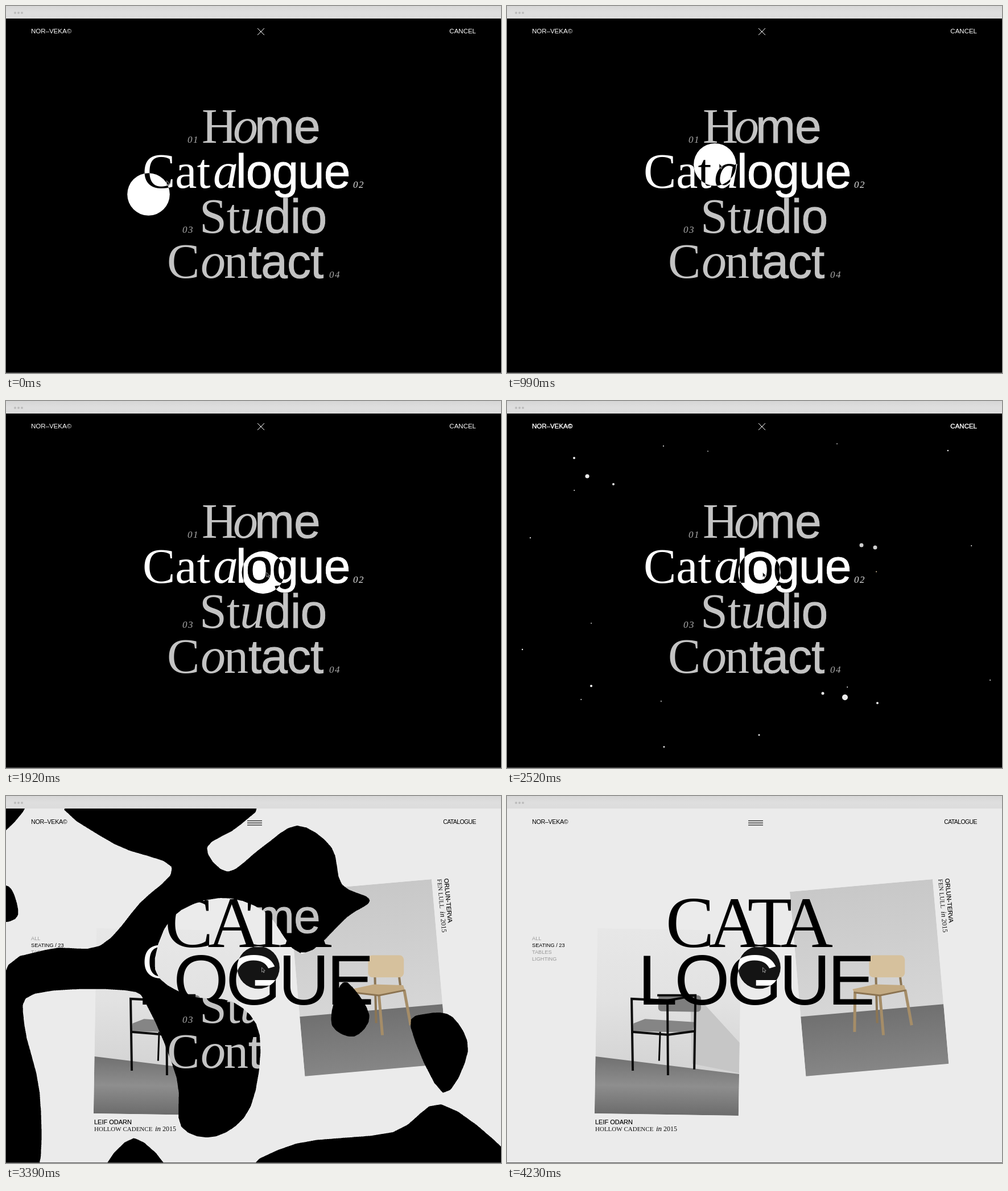
Recreate the animation shown at these times as an HTML page with a canvas. Size 870 px wide and 644 px high, loop 4830 ms.

```html
<!DOCTYPE html>
<html lang="en">
<head>
<meta charset="utf-8">
<title>Menu transition</title>
<style>
html, body { margin: 0; width: 100%; height: 100%; overflow: hidden; background: #000; }
canvas { display: block; }
</style>
</head>
<body>
<canvas id="stage" width="870" height="644"></canvas>
<script>
const W = 870, H = 644, LOOP = 4830;
const START = 2250, DOTS = 2520, BLOBS = 3000, PATCHES = 3390, DONE = 4230;
const SANS = '"Liberation Sans", Arial, sans-serif';
const SERIF = '"Liberation Serif", "Times New Roman", serif';
const PAPER = '#ebebeb';

const clamp = v => Math.max(0, Math.min(1, v));
const mix = (a, b, w) => a + (b - a) * w;
const pairs = a => Array.from({ length: a.length / 2 }, (_, i) => [a[2 * i], a[2 * i + 1]]);

function layer(paint, w = W, h = H) {
  const canvas = document.createElement('canvas');
  canvas.width = w;
  canvas.height = h;
  const c = canvas.getContext('2d', { willReadFrequently: !paint });
  if (paint) paint(c);
  return c;
}

function text(c, s, x, y, font, fill, gap = 0, bold = 0, align = 'left') {
  c.font = font;
  c.letterSpacing = gap + 'px';
  c.textAlign = align;
  c.fillStyle = c.strokeStyle = fill;
  c.fillText(s, x, y);
  if (bold) {
    c.lineWidth = bold;
    c.strokeText(s, x, y);
  }
}

function trace(c, points) {
  c.beginPath();
  pairs(points).forEach(p => c.lineTo(...p));
}
function shape(c, fill, ...points) {
  trace(c, points);
  c.closePath();
  c.fillStyle = fill;
  c.fill();
}
function line(c, color, width, ...points) {
  trace(c, points);
  c.strokeStyle = color;
  c.lineWidth = width;
  c.stroke();
}
function disc(c, x, y, r) {
  c.beginPath();
  c.arc(x, y, r, 0, 7);
  c.fill();
}
function fade(c, y0, y1, ...colors) {
  const g = c.createLinearGradient(0, y0, 0, y1);
  colors.forEach((color, i) => g.addColorStop(i / (colors.length - 1), color));
  return g;
}

// Dark page: words are runs of upright serif (r), italic serif (i) and sans (s)
const WORDS = [
  { runs: [['r', 'H', 344], ['i', 'o', 399], ['s', 'me', 437]], noX: 319 },
  { runs: [['r', 'Cat', 240], ['i', 'a', 364], ['s', 'logue', 404]], noX: 610 },
  { runs: [['r', 'St', 340], ['i', 'u', 411], ['s', 'dio', 454]], noX: 310 },
  { runs: [['r', 'C', 283], ['i', 'o', 342], ['r', 'n', 383], ['s', 'tact', 426]], noX: 568 }
];
const FACES = { r: `86px ${SERIF}`, i: `italic 88px ${SERIF}`, s: `84px ${SANS}` };

function paintMenu(c, bold) {
  c.fillStyle = '#000';
  c.fillRect(0, 0, W, H);
  text(c, 'NOR–VEKA©', 44, 48, `11.5px ${SANS}`, '#fff', 0, bold);
  text(c, 'CANCEL', 826, 48, `11.5px ${SANS}`, '#fff', 0, bold, 'right');
  line(c, '#fff', 1, 442, 39, 454, 51);
  line(c, '#fff', 1, 454, 39, 442, 51);
  WORDS.forEach(({ runs, noX }, i) => {
    const y = 240 + 79 * i, active = i === 1;
    for (const [face, s, x] of runs) {
      const sans = face === 's';
      text(c, s, x, y, FACES[face], active ? '#fff' : '#c3c3c3', sans ? -1 : 0, sans ? 0.9 : 0);
    }
    text(c, '0' + (i + 1), noX, y, `italic 17px ${SERIF}`, active ? '#ddd' : '#aaa', 1.5);
  });
}

// Light page; each photo is drawn upright in its own tilted frame
function photo(c, x, y, degrees, w, h, paint) {
  c.save();
  c.translate(x, y);
  c.rotate(degrees * Math.PI / 180);
  c.beginPath();
  c.rect(0, 0, w, h);
  c.clip();
  paint(c, w, h);
  c.restore();
}

function paintArmchair(c, w, h) {
  c.fillStyle = fade(c, 0, 250, '#e7e7e7', '#e2e2e2', '#d3d3d3');
  c.fillRect(0, 0, w, h);
  shape(c, '#c6c6c6', 165, 115, 185, 125, w, 197, w, 250, 170, 235);
  shape(c, fade(c, 225, h, '#707070', '#8e8e8e', '#6c6c6c'), 0, 225, w, 252, w, h, 0, h);
  c.fillStyle = '#7e7e7e';
  c.beginPath();
  c.roundRect(109, 115, 75, 29, 6);
  c.fill();
  shape(c, '#858585', 66, 166, 86, 158, 173, 162, 170, 180, 65, 180);
  const black = '#0c0c0c';
  line(c, black, 3, 113, 180, 112, 231);
  line(c, black, 4, 66, 249, 62, 123, 125, 125, 128, 256);
  line(c, black, 4, 107, 116, 174, 115, 174, 245);
  line(c, black, 4, 125, 125, 174, 115);
  line(c, black, 4, 65, 181, 127, 185, 173, 178);
}

function paintWoodChair(c, w, h) {
  c.fillStyle = fade(c, 0, 220, '#c8c8c8', '#d6d6d6');
  c.fillRect(0, 0, w, h);
  c.fillStyle = fade(c, 220, h, '#707070', '#868686');
  c.fillRect(0, 220, w, h);
  const wood = '#a58d68';
  line(c, '#8b7554', 4, 138, 159, 133, 243);
  line(c, '#8b7554', 4, 180, 160, 181, 184);
  line(c, wood, 5, 99, 184, 92, 255);
  line(c, wood, 5, 142, 193, 142, 265);
  line(c, wood, 5, 187, 189, 193, 252);
  shape(c, '#c3aa82', 95, 180, 135, 175, 186, 181, 188, 189, 142, 194, 97, 185);
  line(c, '#8b7351', 3, 97, 186, 142, 195, 188, 190);
  photo(c, 129, 123, 5, 64, 40, () => {
    c.fillStyle = '#d6c19d';
    c.beginPath();
    c.roundRect(0, 0, 63, 39, 8);
    c.fill();
  });
}

function caption(c, name, title, end) {
  text(c, name, 0, 0, `11px ${SANS}`, '#000', 0, 0.15);
  text(c, title, 0, 12, `11px ${SERIF}`, '#111');
  text(c, 'in', end, 12, `italic 13px ${SERIF}`, '#000');
  text(c, '2015', end + 13, 12, `12px ${SERIF}`, '#111');
}

function paintCatalogue(c) {
  c.fillStyle = PAPER;
  c.fillRect(0, 0, W, H);
  photo(c, 159, 232, 0.9, 253, 325, paintArmchair);
  photo(c, 497, 168, -5, 252, 325, paintWoodChair);
  text(c, 'NOR–VEKA©', 44, 48.5, `10.7px ${SANS}`, '#000', -0.3);
  text(c, 'CATALOGUE', 826, 48.5, `10.5px ${SANS}`, '#000', -0.6, 0, 'right');
  for (const y of [43.5, 47.3, 51]) line(c, '#222', 1.3, 424, y, 450, y);
  ['ALL', 'SEATING / 23', 'TABLES', 'LIGHTING'].forEach((s, i) =>
    text(c, s, 44, 252.5 + i * 12.2, `9.2px ${SANS}`, i === 1 ? '#000' : '#999'));
  text(c, 'CATA', 279, 265, `128px ${SERIF}`, '#000', -10);
  text(c, 'LOGUE', 230, 366, `125px ${SANS}`, '#000', -5.2);
  c.save();
  c.translate(155, 576);
  caption(c, 'LEIF ODARN', 'HOLLOW CADENCE', 107);
  c.translate(615, -431);
  c.rotate(85 * Math.PI / 180);
  caption(c, 'ORLUN-TERVA', 'FEN LULL', 57);
  c.restore();
}

// Reveal shapes: round drops, smooth blobs and the dark patches left at the end
const drops = [
  [52, 406, 17], [250, 109, 14.5], [605, 105, 12.5], [750, 117, 17], [468, 556, 21], [246, 497, 18.5],
  [173, 360, 12.5], [251, 577, 20], [378, 118, 12], [16, 270, 16], [440, 638, 22], [351, 645, 18],
  [732, 35, 18], [868, 153, 14]
];
const blobs = [
  [97, 50, 170, 97, 194, 133, 124, 200, 103, 262, 82, 232, 102, 194, 74, 85],
  [271, 318, 320, 235, 410, 240, 478, 280, 410, 293, 345, 320],
  [592, 265, 645, 247, 700, 270, 673, 322, 653, 375, 632, 318],
  [492, 346, 540, 375, 525, 432, 463, 390],
  [530, 460, 640, 450, 703, 517, 600, 563, 518, 520],
  [123, 441, 192, 528, 130, 606, 76, 520],
  [828, 207, 855, 235, 800, 309, 782, 265],
  [835, 408, 885, 465, 885, 566, 805, 540, 836, 470]
];
const seeds = [
  [118, 100, 2], [141, 132, 3.5], [187, 146, 2], [148, 500, 2],
  [623, 253, 3.5], [647, 257, 3.5], [555, 513, 2.5], [594, 520, 5], [651, 530, 2]
];
const mainland = [
  110, 10, 421, 10, 410, 52, 353, 90, 390, 133, 450, 90, 512, 52, 572, 90, 590, 155, 640, 182, 600, 212,
  520, 277, 455, 203, 375, 179, 291, 214, 262, 305, 320, 350, 400, 362, 446, 420, 430, 545, 370, 597,
  308, 580, 300, 495, 250, 372, 210, 341, 50, 347, 32, 400, 59, 520, 55, 660, -10, 660, -10, 332,
  70, 270, 165, 263, 235, 188, 292, 125, 190, 84
];
const islands = [
  [-10, 10, 36, 16, -10, 66],
  [-10, 162, 10, 164, 21, 210, -10, 218],
  [600, 327, 639, 385, 612, 422, 573, 403, 580, 350],
  [740, 382, 785, 388, 812, 447, 768, 521, 711, 405],
  [765, 541, 880, 625, 880, 660, 455, 660, 510, 610, 680, 590],
  [175, 660, 225, 600, 282, 660]
];

// Dots hold a start circle, then an end circle; drops drift towards mid-height
const centre = p => [0, 1].map(k => p.reduce((sum, q) => sum + q[k], 0) / p.length);
const dots = [
  ...drops.map(([x, y, r], i) =>
    [x + (i % 2 ? 25 : -25), y + (y < 300 ? -30 : 30), r * 0.07, x, y, r]),
  ...seeds.map(s => [...s, ...s]),
  ...blobs.map(b => [...centre(pairs(b)), 1]).map(s => [...s, ...s])
];

// Signed distances (positive inside) on a coarse grid
const CELL = 4, COLS = Math.ceil(W / CELL) + 1, ROWS = Math.ceil(H / CELL) + 1;
const grid = f => Float32Array.from({ length: COLS * ROWS },
  (_, i) => f(i % COLS * CELL, Math.floor(i / COLS) * CELL));

function smooth(flat, steps = 4) {
  const p = pairs(flat), n = p.length, out = [];
  for (let i = 0; i < n; i++) {
    const [a, b, c, d] = [n - 1, 0, 1, 2].map(k => p[(i + k) % n]);
    for (let s = 0; s < steps; s++) {
      const u = s / steps;
      out.push([0, 1].map(k => b[k] + u / 2 * (c[k] - a[k] +
        u * (2 * a[k] - 5 * b[k] + 4 * c[k] - d[k] + u * (3 * b[k] - a[k] - 3 * c[k] + d[k])))));
    }
  }
  return out;
}

function distances(loops) {
  const edges = loops.map(l => smooth(l)).flatMap(p => p.map((a, i) => {
    const b = p[(i + 1) % p.length];
    return { x: a[0], y: a[1], dx: b[0] - a[0], dy: b[1] - a[1] };
  }));
  return grid((px, py) => {
    let best = Infinity, inside = false;
    for (const { x, y, dx, dy } of edges) {
      const ex = px - x, ey = py - y;
      const k = clamp((ex * dx + ey * dy) / (dx * dx + dy * dy || 1));
      const qx = ex - k * dx, qy = ey - k * dy;
      best = Math.min(best, qx * qx + qy * qy);
      if ((ey < 0) !== (ey < dy) && ex < dx * ey / dy) inside = !inside;
    }
    return Math.sqrt(best) * (inside ? 1 : -1);
  });
}
const circles = k => grid((x, y) =>
  Math.max(...dots.map(d => d[k + 2] - Math.hypot(x - d[k], y - d[k + 1]))));

const seedField = circles(0), blobField = distances(blobs);
const dropField = circles(3).map((d, i) => Math.max(d, blobField[i]));
const paperField = distances([mainland, ...islands]).map(d => -d);

const coarse = layer(null, COLS, ROWS), mask = layer(null);
const cells = coarse.createImageData(COLS, ROWS);

function paintMask(t) {
  const w = clamp((t - DOTS) / (BLOBS - DOTS));
  const u = clamp((t - BLOBS) / (PATCHES - BLOBS));
  const grow = 80 * clamp((t - PATCHES) / (DONE - PATCHES));
  const [from, to, k] = t < BLOBS ? [seedField, blobField, w] : [dropField, paperField, u];
  mask.clearRect(0, 0, W, H);
  if (t > DOTS) {
    for (let i = 0; i < from.length; i++) cells.data[4 * i + 3] = 128 + 4 * (mix(from[i], to[i], k) + grow);
    coarse.putImageData(cells, 0, 0);
    mask.drawImage(coarse.canvas, -CELL / 2, -CELL / 2, COLS * CELL, ROWS * CELL);
    const image = mask.getImageData(0, 0, W, H), a = image.data;
    for (let i = 3; i < a.length; i += 4) a[i] = (a[i] - 128) * 64 + 128;
    mask.putImageData(image, 0, 0);
  }
  if (t >= BLOBS) return;
  const birth = clamp((t - START) / (DOTS - START));
  for (const [x, y, r, x2, y2, r2] of dots) disc(mask, mix(x, x2, w), mix(y, y2, w), mix(r, r2, w) * birth);
}

// Pointer disc: time, x, y
const path = [
  [0, 250.5, 330.5], [540, 318, 276.5], [1080, 375.5, 279.5], [1440, 424, 291.5],
  [1620, 434.5, 297], [1860, 453, 300.5], [2130, 443.5, 301]
];

function slope(i, k) {
  if (!path[i - 1] || !path[i + 1]) return 0;
  const [a, b, c] = [path[i - 1], path[i], path[i + 1]];
  return (b[k] - a[k]) * (c[k] - b[k]) <= 0 ? 0 : (c[k] - a[k]) / (c[0] - a[0]);
}

function pointer(t) {
  const i = path.findIndex(p => p[0] > t) - 1;
  if (i < 0) return path[path.length - 1].slice(1);
  const a = path[i], b = path[i + 1], span = b[0] - a[0], u = (t - a[0]) / span;
  return [1, 2].map(k => mix(a[k], b[k], u * u * (3 - 2 * u)) +
    span * u * (1 - u) * ((1 - u) * slope(i, k) - u * slope(i + 1, k)));
}

function paintPointer(c, t) {
  const [x, y] = pointer(t);
  c.globalCompositeOperation = 'difference';
  c.fillStyle = '#fff';
  disc(c, x, y, 37.3);
  c.globalCompositeOperation = 'source-over';
  // The arrow leads the trailing disc
  const lead = Math.exp(-t / 350);
  c.save();
  c.translate(x + 6 + 26 * lead, y - 24 * lead);
  shape(c, '#111', 0, 0, 0, 8, 2, 6.3, 3.2, 9, 4.5, 8.4, 3.3, 5.8, 5.8, 5.6);
  c.strokeStyle = '#ddd';
  c.lineWidth = 0.6;
  c.stroke();
  c.restore();
}

function paintWindow(c) {
  c.fillStyle = fade(c, 0, 22, '#d6d6d6', '#dedede', '#dcdcdc');
  c.fillRect(0, 0, W, 22);
  c.fillStyle = '#bcbcbc';
  for (const x of [16, 22, 28]) disc(c, x, 12, 2);
  c.fillStyle = '#555';
  c.fillRect(0, H - 1, W, 1);
}

const menu = layer(c => paintMenu(c, 0)).canvas;
const boldMenu = layer(c => paintMenu(c, 0.4)).canvas;
const catalogue = layer(paintCatalogue).canvas;
const stage = document.getElementById('stage').getContext('2d');

function draw(now) {
  const t = now % LOOP;
  stage.drawImage(t >= DONE ? catalogue : t > START ? boldMenu : menu, 0, 0);
  if (t > START && t < DONE) {
    paintMask(t);
    mask.globalCompositeOperation = 'source-in';
    mask.drawImage(catalogue, 0, 0);
    mask.globalCompositeOperation = 'source-over';
    stage.drawImage(mask.canvas, 0, 0);
  }
  paintPointer(stage, t);
  paintWindow(stage);
  requestAnimationFrame(draw);
}
requestAnimationFrame(draw);
</script>
</body>
</html>
```
